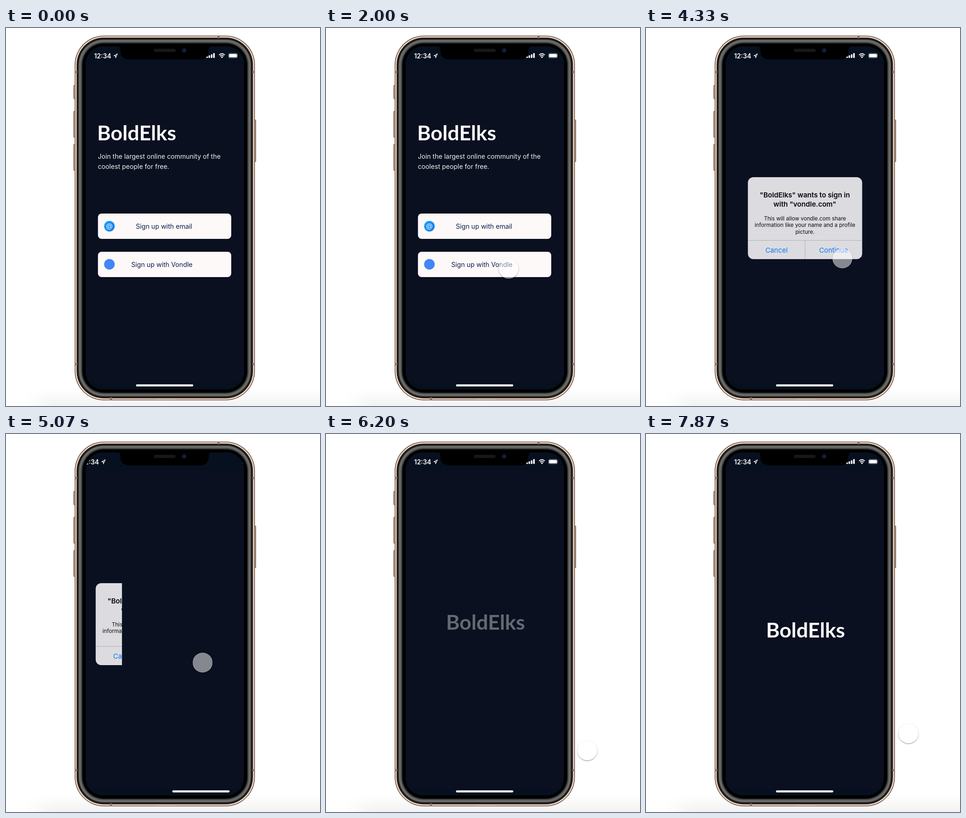
An HTML page for the animation above (8000 ms loop, 682 px wide and 821 px high).

```html
<!DOCTYPE html>
<html lang="en">
<head>
<meta charset="utf-8">
<title>Sign-up flow</title>
<style>
  html, body { margin: 0; width: 100%; height: 100%; overflow: hidden; background: #fff; }
  svg { display: block; position: absolute; left: 0; top: 0; width: 100%; height: 100%; }
  text { font-family: Inter, "Liberation Sans", sans-serif; }
  .brand { font: 700 44.8px Lato, "Open Sans", sans-serif; fill: #fdfcfb; }
  .lead { font-size: 14.05px; fill: #f1f1f3; }
  .card { fill: #fcf9f8; }
  .label { font-size: 14.2px; fill: #0b1c4e; }
  .mid { text-anchor: middle; }
  .head { font-size: 15.1px; font-weight: 600; fill: #060608; }
  .note { font-size: 11.7px; fill: #0c0c0e; }
  .action { font-size: 14.8px; fill: #0a78f0; }
  #cursor {
    position: absolute; left: -21.5px; top: -21.5px; width: 43px; height: 43px;
    box-sizing: border-box; border: 1px solid rgba(255,255,255,.2); border-radius: 50%;
    background: rgba(255,255,255,.5);
    box-shadow: 0 1px 2px rgba(0,0,0,.5);
  }
</style>
</head>
<body>
<svg viewBox="0 0 682 821">
  <defs>
    <clipPath id="screen"><rect x="173" y="40" width="344" height="745" rx="38"/></clipPath>
    <linearGradient id="floor" x1="0" y1="0" x2="0" y2="1">
      <stop offset="0" stop-color="#000" stop-opacity="0"/>
      <stop offset="1" stop-color="#000" stop-opacity=".05"/>
    </linearGradient>
    <linearGradient id="fade">
      <stop offset="0" stop-color="#000"/>
      <stop offset="1" stop-color="#fff"/>
    </linearGradient>
    <mask id="floorMask">
      <rect x="40" y="780" width="60" height="41" fill="url(#fade)"/>
      <rect x="100" y="780" width="582" height="41" fill="#fff"/>
    </mask>
    <linearGradient id="mail" x1="0" y1="0" x2="1" y2="1">
      <stop offset="0" stop-color="#16a9fb"/>
      <stop offset="1" stop-color="#1673ee"/>
    </linearGradient>

    <g id="chrome">
      <rect x="173" y="40" width="344" height="745" fill="#0a1020"/>
      <rect x="173" y="40" width="344" height="40" fill="#07101f"/>
      <rect x="173" y="768" width="344" height="17" fill="#07101f"/>
      <text x="191.5" y="65.5" font-size="13.9" font-weight="600" fill="#fff">12:34</text>
      <path d="M242 56 L234.2 60.4 H238 V64.8 Z" fill="none" stroke="#fff" stroke-width="1.2" stroke-linejoin="round"/>
      <g fill="#fff">
        <rect x="435" y="61.6" width="3.4" height="3.4" rx="1"/>
        <rect x="440" y="59.6" width="3.4" height="5.4" rx="1"/>
        <rect x="445" y="57.2" width="3.4" height="7.8" rx="1"/>
        <rect x="450" y="54.6" width="3.4" height="10.4" rx="1"/>
        <path d="M469 65.4 L466.6 62.9 Q469 61 471.4 62.9 Z"/>
        <rect x="484.4" y="56.2" width="17.2" height="7.6" rx="1.6"/>
        <path d="M503.4 58.2 q1.5 1.8 0 3.6 Z" opacity=".5"/>
      </g>
      <g fill="none" stroke="#fff">
        <path d="M465 61.2 Q469 57.8 473 61.2 M462.7 58.7 Q469 52.9 475.3 58.7" stroke-width="1.8"/>
        <rect x="483.2" y="55" width="19.6" height="10" rx="2.8" stroke-width=".9" opacity=".45"/>
      </g>
      <rect x="282.3" y="773.9" width="124.4" height="4.6" rx="2.3" fill="#fff"/>
    </g>
  </defs>

  <rect y="784" width="682" height="37" fill="url(#floor)" mask="url(#floorMask)"/>

  <!-- phone body -->
  <g fill="#d3b79f" stroke="#4a3528">
    <rect x="147" y="124.5" width="5" height="29.5" rx="1.5"/>
    <rect x="147" y="180.5" width="5" height="57" rx="1.5"/>
    <rect x="147" y="252.5" width="5" height="57" rx="1.5"/>
    <rect x="537.5" y="199.5" width="5" height="91" rx="1.5"/>
  </g>
  <g id="body"></g>
  <g fill="#8d7768">
    <path d="M150.5 93.5h4.5v4.5h-4.5z M150.5 728h4.5v4.5h-4.5z M535 93.5h4.5v4.5h-4.5z M535 728h4.5v4.5h-4.5z"/>
    <path d="M459.5 17.8h4.5v4.5h-4.5z M225.5 802.5h4.5v4.8h-4.5z"/>
  </g>
  <path d="M323 807.7h44" stroke="#8d7768"/>

  <g clip-path="url(#screen)">
    <g id="first">
      <use href="#chrome"/>
      <g id="home">
        <text class="brand" x="198" y="244.3">BoldElks</text>
        <text class="lead" x="199.5" y="284">Join the largest online community of the</text>
        <text class="lead" x="199.5" y="305.5">coolest people for free.</text>
        <rect class="card" x="199.7" y="403" width="289.5" height="55" rx="8"/>
        <circle cx="224.6" cy="430.5" r="11.5" fill="url(#mail)"/>
        <text class="mid" x="224.6" y="434.8" font-size="14.5" fill="#fff">@</text>
        <text class="label" x="282" y="436.2">Sign up with email</text>
        <rect class="card" x="199.7" y="486" width="289.5" height="55" rx="8"/>
        <circle cx="224.6" cy="513.2" r="11.5" fill="#4285f4"/>
        <text class="label" x="272" y="518.8">Sign up with Vondle</text>
      </g>
      <g id="alert" class="mid">
        <rect x="221.3" y="324" width="248.2" height="178" rx="12" fill="#dcdce0"/>
        <path d="M221.3 461.3H469.5M345.5 461.3V502" stroke="#a8a8ad" stroke-width=".9"/>
        <text class="head" x="345" y="368.3">"BoldElks" wants to sign in</text>
        <text class="head" x="345" y="388.3">with "vondle.com"</text>
        <text class="note" x="345.3" y="417.6">This will allow vondle.com share</text>
        <text class="note" x="345.3" y="432.4">information like your name and a profile</text>
        <text class="note" x="345.3" y="447.2">picture.</text>
        <text class="action" x="283.5" y="487.5">Cancel</text>
        <text class="action" x="407.5" y="487.5">Continue</text>
      </g>
    </g>
    <g id="second">
      <use href="#chrome"/>
      <text id="logo" class="brand mid" x="346.5" y="0">BoldElks</text>
    </g>
  </g>

  <!-- notch -->
  <path d="M241 39 Q248 40 248.5 47 V50 Q249 68 268 68 H421 Q440 68 440 50 V47 Q440.5 40 448 39 Z"/>
  <rect x="321" y="45.3" width="47.5" height="6.8" rx="3.4" fill="#171717"/>
  <circle cx="387" cy="48.6" r="5.4" fill="#0b1322"/>
  <circle cx="387" cy="48.6" r="2.6" fill="#16284c"/>
</svg>
<div id="cursor"></div>

<script>
const $ = id => document.getElementById(id);
const LOOP = 8000, WIDTH = 344;
const ALERT_AT = 2930, PUSH_AT = 4790, LOGO_AT = 5600;

// Nested shells: inset, colour
const shells = [[0, '#4a3327'], [1.3, '#f1dccd'], [4, '#4a3327'], [5.3, '#171413'],
                [8, '#4b4f4e'], [9.5, '#6a6d6c'], [13, '#505453'], [15, '#2c2f2e'], [16.6, '#000']];
$('body').innerHTML = shells.map(([d, fill]) =>
  `<rect x="${149.3 + d}" y="${16.8 + d}" width="${391.2 - 2 * d}" height="${791.7 - 2 * d}" rx="${63 - d}" fill="${fill}"/>`
).join('');

// Pointer waypoints: time, x, y
const path = [
  [70, 599, 397], [330, 441, 528], [410, 441, 528], [700, 425, 633], [1200, 396, 521],
  [1330, 395.5, 522], [1950, 395.5, 522], [2250, 408, 527], [2470, 407.5, 524], [3220, 407.5, 524],
  [3600, 428, 619], [4080, 419, 514], [4330, 426, 500], [4600, 426.5, 496], [5250, 426.5, 496],
  [5600, 526, 700], [5735, 543, 728], [6200, 567, 687], [6800, 569, 658], [7500, 569.5, 650],
  [LOOP, 569.5, 650]
];

function slope(i, k) {
  const a = path[i - 1], b = path[i], c = path[i + 1];
  if (!a || !c || a[k] === b[k] || b[k] === c[k]) return 0;
  return (c[k] - a[k]) / (c[0] - a[0]);
}

// Smooth curve through the waypoints
function pointer(t) {
  let i = 0;
  while (i < path.length - 2 && t >= path[i + 1][0]) i++;
  const a = path[i], b = path[i + 1], d = b[0] - a[0];
  const u = (t - a[0]) / d, v = 1 - u;
  return [1, 2].map(k =>
    a[k] * v * v * (1 + 2 * u) + b[k] * u * u * (3 - 2 * u) +
    d * u * v * (slope(i, k) * v - slope(i + 1, k) * u));
}

const spring = s => s <= 0 ? 0 : 1 - (1 + 10 * s) * Math.exp(-10 * s);
const show = (id, on) => $(id).style.display = on ? '' : 'none';

function draw(t) {
  show('home', t < ALERT_AT);
  show('alert', t >= ALERT_AT);

  const p = spring((t - PUSH_AT) / 1000);
  $('first').setAttribute('transform', `translate(${-0.1 * WIDTH * p} 0)`);
  $('second').setAttribute('transform', `translate(${WIDTH * (1 - p)} 0)`);
  show('second', p > 0);

  const lift = 23.5 * (1 + Math.cos((t - 5790) / 1450 * 2 * Math.PI));
  $('logo').setAttribute('y', 443.8 - lift);
  $('logo').setAttribute('opacity', Math.max(0, Math.min(1, (t - LOGO_AT) / 1600)));

  show('cursor', t >= path[0][0]);
  const [x, y] = pointer(Math.max(t, path[0][0]));
  $('cursor').style.transform = `translate(${x}px, ${y}px)`;
}

const start = performance.now();
function tick() {
  draw((performance.now() - start) % LOOP);
  requestAnimationFrame(tick);
}
tick();
</script>
</body>
</html>
```
